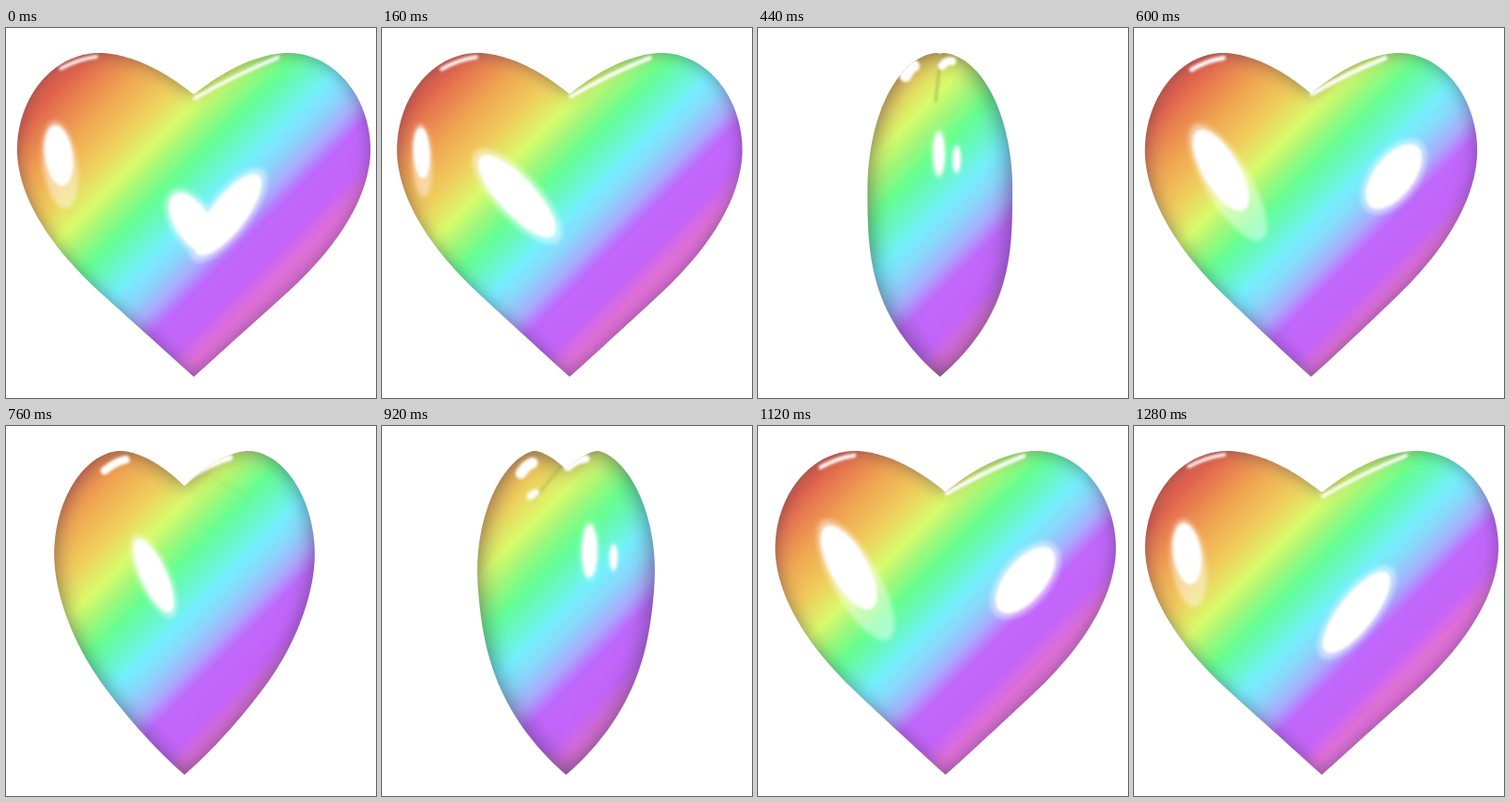
These frames come from a looping animation (400x400 px, 1320 ms). An HTML page:

```html
<!DOCTYPE html>
<html lang="en">
<head>
<meta charset="utf-8">
<title>Spinning rainbow heart</title>
<style>
  html, body { margin: 0; width: 100%; height: 100%; overflow: hidden; background: #fff; }
  svg { display: block; width: 100vw; height: 100vh; }
</style>
</head>
<body>
<svg viewBox="0 0 400 400">
  <defs>
    <linearGradient id="rainbow" gradientUnits="userSpaceOnUse" x2="290" y2="290">
      <stop offset="0" stop-color="#e2624e"/>
      <stop offset=".15" stop-color="#f0a552"/>
      <stop offset=".26" stop-color="#f0cc5c"/>
      <stop offset=".36" stop-color="#d8fb6c"/>
      <stop offset=".42" stop-color="#a2f878"/>
      <stop offset=".49" stop-color="#66ff90"/>
      <stop offset=".55" stop-color="#68f8c0"/>
      <stop offset=".62" stop-color="#74f0fc"/>
      <stop offset=".68" stop-color="#88d8fc"/>
      <stop offset=".745" stop-color="#a8acfc"/>
      <stop offset=".8" stop-color="#c068fc"/>
      <stop offset=".9" stop-color="#c464f8"/>
      <stop offset=".96" stop-color="#e070d8"/>
    </linearGradient>
    <filter id="rim" filterUnits="userSpaceOnUse" x="-40" y="-40" width="480" height="480" color-interpolation-filters="sRGB">
      <feGaussianBlur id="rimBlur" in="SourceAlpha" result="soft"/>
      <feFlood id="rimTint" flood-color="#33344c"/>
      <feComposite operator="out" in2="soft"/>
      <feComposite operator="in" in2="SourceAlpha" result="edge"/>
      <feMerge><feMergeNode in="SourceGraphic"/><feMergeNode in="edge"/></feMerge>
    </filter>
    <filter id="blur" filterUnits="userSpaceOnUse" x="0" y="0" width="400" height="400">
      <feGaussianBlur stdDeviation="1.6"/>
    </filter>
    <filter id="haze" filterUnits="userSpaceOnUse" x="0" y="0" width="400" height="400">
      <feGaussianBlur stdDeviation="2.5"/>
    </filter>
    <clipPath id="clip"><path id="mask"/></clipPath>
  </defs>
  <path id="body" fill="url(#rainbow)" filter="url(#rim)"/>
  <g clip-path="url(#clip)">
    <path id="crease" stroke="#6f8a34" stroke-width="3" fill="none" filter="url(#blur)"/>
    <g id="hazes" fill="#fff" opacity=".45" filter="url(#haze)"></g>
    <g id="lights" fill="#fff" filter="url(#blur)"></g>
    <g id="glints" stroke="#fff" stroke-linecap="round" fill="none"></g>
  </g>
</svg>
<script>
const LOOP = 1320, STEP = 40, TURN = 1300;
const TOP = 27, NOTCH = 72, TIP = 377;
const $ = id => document.getElementById(id);
const mix = (a, b, k) => a + (b - a) * k;
const blend = (a, b, k) => a.map((v, i) => mix(v, b[i], k));
const fix = v => v.toFixed(2);

// Half width r, lobe centre c and half depth of the heart at height y
function slice(y) {
  let r = 100 * (TIP - y) / 90, c = 0;
  if (y < 132) r = 102 + 89 * Math.sqrt(1 - ((132 - y) / 105) ** 2);
  else if (y < 287) r = 191 - 91 * ((y - 132) / 155) ** 1.87;
  if (y < NOTCH) c = (r + 102 * (1 - (1 - (NOTCH - y) / 45) ** 0.55)) / 2;
  const depth = 78 * (y < 175
    ? Math.sqrt(1 - ((175 - y) / 148) ** 2)
    : 1 - ((y - 175) / 202) ** 3);
  return { y, r, c, depth };
}
const slices = Array.from({ length: 111 }, (_, i) => slice(TOP + (TIP - TOP) * (i / 110) ** 2));

function outline(cx, cos, sin) {
  const lobe = side => {
    const left = [], right = [];
    for (const s of slices) {
      const mid = s.c * Math.abs(cos), half = Math.hypot(s.r * cos, s.depth * sin) - mid;
      left.push(fix(cx + side * mid - half) + ' ' + fix(s.y));
      right.unshift(fix(cx + side * mid + half) + ' ' + fix(s.y));
    }
    return 'M' + left.concat(right).join('L') + 'Z';
  };
  return lobe(-1) + lobe(1);
}

// Reflections drift as the heart turns: angle, then x (from the centre), y, rx, ry, tilt.
// The heart looks alike from behind, so each track is read at phi and phi + 180.
const tracks = [
  { tail: 0, keys: [
    [-12, 10, 235, 0, 0, -33], [0, -1, 211, 19, 37, -33], [13, -57, 182, 20, 58, -43],
    [92, -2, 136, 6, 23, 0], [109, 25, 135, 8, 28, 0], [161, 93, 162, 22, 42, 40],
    [180, 37, 202, 19, 54, 38], [192, -20, 225, 0, 0, 38]] },
  { tail: .3, keys: [
    [118, -76, 135, 0, 0, -8], [161, -99, 155, 21, 53, -32],
    [180, -146, 138, 15, 33, -8], [193, -160, 135, 9, 28, -3], [214, -154, 135, 0, 0, 0]] },
  { tail: 0, keys: [[62, 2, 145, 0, 0, 0], [92, 17, 142, 4, 14, 0], [109, 51, 142, 4, 14, 0], [135, 80, 145, 0, 0, 0]] },
  { tail: 0, keys: [[95, -20, 66, 0, 0, 55], [109, -36, 74, 4, 7, 55], [140, -14, 78, 0, 0, 55]] }
];
// Top edge glints: x1, y1, x2, y2, width, seen from the front and from the side
const glints = [
  { front: [-144, 44, -105, 31, 3.5], side: [-37, 52, -28, 41, 13] },
  { front: [1, 76, 91, 32, 4], side: [2, 41, 13, 36, 9] }
];

function add(group, tag) {
  return $(group).appendChild(document.createElementNS('http://www.w3.org/2000/svg', tag));
}
function set(el, attrs) {
  for (const k in attrs) el.setAttribute(k, attrs[k]);
}
const spots = tracks.flatMap(track => [0, 180].map(turn => (
  { ...track, turn, core: add('lights', 'ellipse'), haze: add('hazes', 'ellipse') })));
for (const g of glints) {
  g.el = add('glints', 'path');
  set(g.el, { filter: 'url(#blur)' });
}

function pose(keys, angle) {
  const i = keys.findIndex(k => k[0] > angle);
  if (i < 1) return [0, 0, 0, 0, 0, 0];
  const a = keys[i - 1], b = keys[i];
  return blend(a, b, (angle - a[0]) / (b[0] - a[0]));
}
function place(el, x, y, rx, ry, tilt, shift) {
  set(el, { rx: fix(rx), ry: fix(ry), transform: `translate(${fix(x)} ${fix(y)}) rotate(${fix(tilt)}) translate(0 ${fix(shift)})` });
}

function draw(ms) {
  const t = Math.floor((ms % LOOP) / STEP) * STEP;
  const deg = 180 * (1 - Math.cos(Math.PI * Math.min(1, t / TURN)));
  const phi = deg % 180, rad = deg * Math.PI / 180;
  const cos = Math.cos(rad), sin = Math.sin(rad), cx = 197 + 6 * cos;
  const edge = sin * sin;

  const d = outline(cx, cos, sin);
  set($('body'), { d });
  set($('mask'), { d });
  set($('rainbow'), { x1: 60 - 16 * edge, y1: 60 - 16 * edge });
  set($('rimBlur'), { stdDeviation: 9 + 4 * edge });
  set($('rimTint'), { 'flood-opacity': .5 + .2 * edge });

  const fold = cx + 107 * Math.cos(phi * Math.PI / 180);
  set($('crease'), { d: `M${fix(cx)} 37L${fix(fold)} 80`, opacity: fix(.4 * edge ** 3) });

  for (const s of spots) {
    const [, x, y, rx, ry, tilt] = pose(s.keys, phi + s.turn);
    place(s.core, cx + x, y, rx, ry, tilt, 0);
    place(s.haze, cx + x, y, rx * 1.25, ry * (1.15 + s.tail), tilt, ry * s.tail);
  }
  for (const g of glints) {
    const [x1, y1, x2, y2, width] = blend(g.front, g.side, edge);
    const mid = fix(cx + (x1 + x2) / 2) + ' ' + fix((y1 + y2) / 2 - 4);
    set(g.el, { d: `M${fix(cx + x1)} ${fix(y1)}Q${mid} ${fix(cx + x2)} ${fix(y2)}`, 'stroke-width': fix(width) });
  }
}

let start = null;
function tick(now) {
  if (start === null) start = now;
  draw(now - start);
  requestAnimationFrame(tick);
}
draw(0);
requestAnimationFrame(tick);
</script>
</body>
</html>
```
